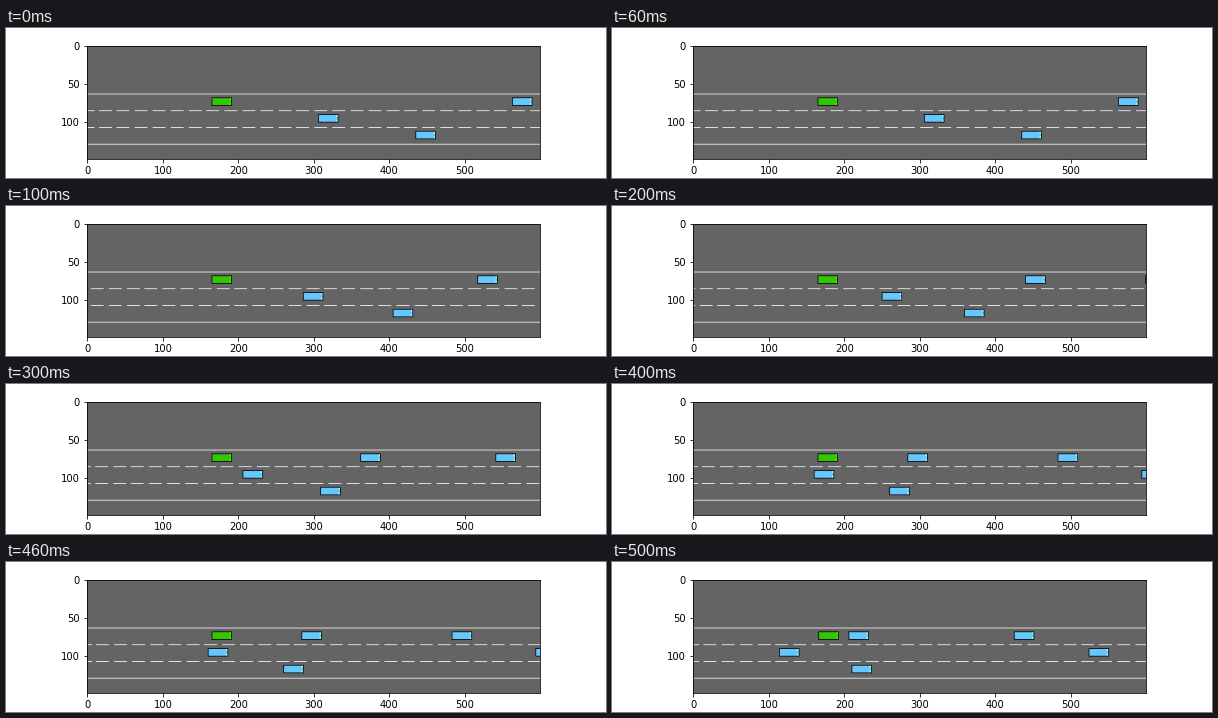
Write a matplotlib script that moves like this. It is 600 px wide and 150 px high and loops after 600 ms.

```python
import numpy as np
import matplotlib.pyplot as plt
from matplotlib.animation import FuncAnimation

WIDTH, HEIGHT = 600, 150
SCALE = 5.5  # image pixels per metre
ROAD_TOP, LANE_WIDTH, LANES = 64, 22, 3
CAR_LENGTH, CAR_WIDTH = 27, 11
STRIPE_PERIOD, STRIPE_LENGTH = 4.33 * SCALE, 3 * SCALE
FIRST_STRIPE = 16

ROAD, LINE = (100, 100, 100), (255, 255, 255)
GREEN, BLUE = (50, 200, 0), (100, 200, 255)

# lane, start, closing speed per step, early lag, share of lag left per step
TRAFFIC = (
    (0, 563, 78.2, 34, 0.06),
    (1, 306, 47.5, 45.5, 0.39),
    (2, 435, 49.75, 23.6, 0.15),
    (0, 715, 58, 0, 0),
    (1, 874, 70, 0, 0),
)


def travel(step, speed, lag, rate):
    """Distance covered while speeding up towards a constant speed."""
    return speed * step - lag * (1 - rate ** step)


def fill(image, x, y, width, height, color):
    image[y:y + height, max(x, 0):max(x + width, 0)] = color


def draw_car(image, x, lane, color):
    x, y = round(x), ROAD_TOP + 5 + lane * LANE_WIDTH
    headlight = [min(int(c / 0.68), 255) for c in color]
    fill(image, x, y, CAR_LENGTH, CAR_WIDTH, (0, 0, 0))
    fill(image, x + 1, y + 1, CAR_LENGTH - 2, CAR_WIDTH - 2, color)
    for offset in (1, 7):
        fill(image, x + 24, y + offset, 2, 3, headlight)


def draw_road(image, step):
    distance = travel(step, 30 * SCALE, 14, 0.18)
    first = (FIRST_STRIPE - distance) % STRIPE_PERIOD - STRIPE_PERIOD
    for side in range(LANES + 1):
        y = ROAD_TOP + side * LANE_WIDTH
        if side in (0, LANES):
            fill(image, 0, y, WIDTH, 1, LINE)
            continue
        for start in np.arange(first, WIDTH, STRIPE_PERIOD):
            fill(image, int(start), y, int(STRIPE_LENGTH) + 1, 1, LINE)


def render(step):
    image = np.full((HEIGHT, WIDTH, 3), ROAD, dtype=np.uint8)
    draw_road(image, step)
    for lane, start, *motion in TRAFFIC:
        draw_car(image, start - travel(step, *motion), lane, BLUE)
    draw_car(image, 165 + 0.12 * step, 0, GREEN)
    return image


plt.rcParams.update({"font.family": "DejaVu Sans", "font.size": 10})
fig, ax = plt.subplots(figsize=(WIDTH / 72, HEIGHT / 72), dpi=72)
fig.subplots_adjust(left=0.125, right=0.9, bottom=0.125, top=0.88)
view = ax.imshow(render(0))


def update(step):
    view.set_data(render(step))
    return (view,)


animation = FuncAnimation(fig, update, frames=6, interval=100, repeat=True)
plt.show()
```
